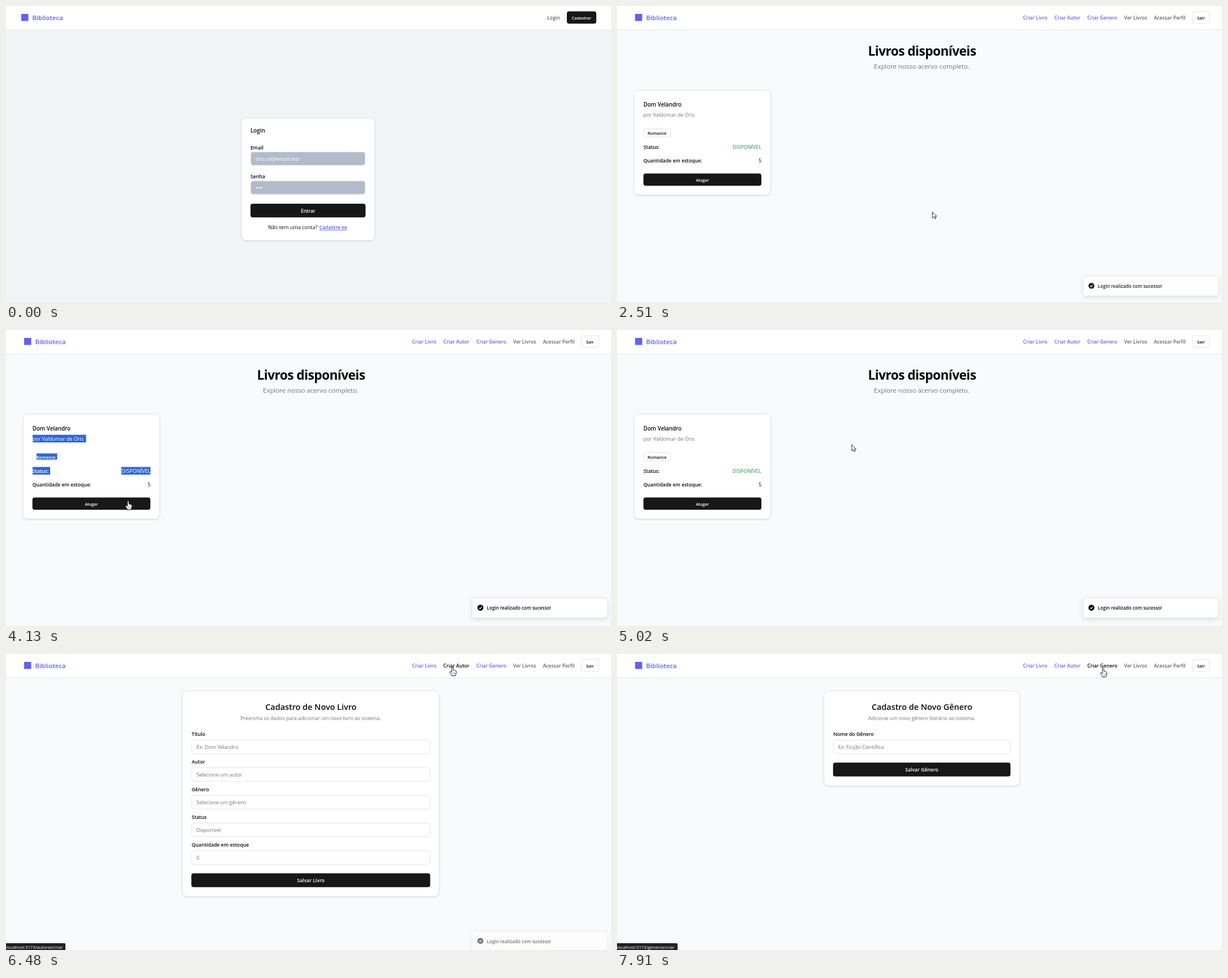
These frames come from a looping animation (1069 by 524 pixels, 8 s). An HTML page:

```html
<!DOCTYPE html>
<html lang="pt-BR">
<head>
<meta charset="utf-8">
<title>Biblioteca</title>
<style>
html, body { margin: 0; width: 100%; height: 100%; overflow: hidden; background: #f3f4f6; }
svg { display: block; width: 1069px; height: 524px; font-family: "Open Sans", "Noto Sans", sans-serif; }
.card { filter: drop-shadow(0 1px 1px rgba(0,0,0,.12)); }
#toast rect { filter: drop-shadow(0 3px 4px rgba(0,0,0,.1)); }
</style>
</head>
<body>
<svg id="stage" viewBox="0 0 1069 524"></svg>
<script>
const LOOP = 8000, INK = '#0a0a0a', DARK = '#171717', GRAY = '#737373', INDIGO = '#615fff', LINE = '#e2e4e8';
const $ = id => document.getElementById(id);

// Markup helpers
const text = (x, y, s, size, { fill = INK, w = 400, a = 'start', more = '' } = {}) =>
  `<text x="${x}" y="${y}" font-size="${size}" fill="${fill}" font-weight="${w}" text-anchor="${a}" ${more}>${s}</text>`;
const bold = (x, y, s, size = 8.7, o = {}) => text(x, y, s, size, { w: 600, ...o });
const mid = (x, y, s, size, fill = INK) => bold(x, y, s, size, { fill, a: 'middle' });
const rect = (x, y, w, h, r, fill, more = '') =>
  `<rect x="${x}" y="${y}" width="${w}" height="${h}" rx="${r}" fill="${fill}" ${more}/>`;
const box = (x, y, w, h, r, fill = '#fff', more = '') => rect(x, y, w, h, r, fill, `stroke="${LINE}" ${more}`);
const card = (x, y, w, h) => box(x, y, w, h, 8, '#fff', 'class="card"');
const group = (id, body) => `<g id="${id}">${body}</g>`;
const brand = x => rect(x, 14, 12.5, 12.5, 0, INDIGO) + bold(x + 19.5, 24.8, 'Biblioteca', 11.3, { fill: INDIGO });
const bar = rect(0, 0, 1069, 42, 0, '#fff') + rect(0, 42, 1069, 1, 0, '#e5e7eb');

const links = [[739, 'Criar Livro'], [795.8, 'Criar Autor'], [857.5, 'Criar Genero']];
const paths = ['livros', 'autores', 'generos'];

function loginPage() {
  const field = (y, label) => bold(432, y, label) + box(432.5, y + 4.5, 202, 23.5, 4, '#b3bbca');
  return rect(0, 0, 1069, 524, 0, '#f3f4f6') + bar + brand(27) +
    bold(956, 24, 'Login', 8.8, { fill: '#62626a' }) +
    rect(991, 9.5, 52, 21.7, 4, DARK) + mid(1017, 23.5, 'Cadastrar', 7.3, '#fff') +
    card(416, 198.5, 235.5, 216.5) + bold(432, 224, 'Login', 9.8) +
    field(254, 'Email') + text(441, 273.5, 'tino.vd@email.test', 8.95, { fill: '#fff' }) +
    field(305.3, 'Senha') +
    [443, 447, 451].map(x => `<circle cx="${x}" cy="321.7" r="1.3" fill="#fff"/>`).join('') +
    group('ring', rect(431.7, 349.7, 204.1, 25, 5, '#fff', 'stroke="#0a0a0a" stroke-width="1.3"')) +
    rect(432, 350, 203.3, 24.3, 4, DARK, 'id="enter"') + mid(533.7, 365.6, 'Entrar', 8.5, '#fff') +
    text(463, 395.3, 'Não tem uma conta?', 9.05) +
    bold(553.5, 395.3, 'Cadastre-se', 8.7, { fill: '#5558f6', more: 'text-decoration="underline"' });
}

function booksPage() {
  return text(539, 88, 'Livros disponíveis', 22.7, { w: 700, a: 'middle', more: 'letter-spacing="-.57"' }) +
    text(538.5, 111, 'Explore nosso acervo completo.', 11.4, { fill: GRAY, a: 'middle' }) +
    card(30, 149, 241.5, 185.5) + bold(46.7, 177.5, 'Dom Velandro', 9.8) +
    box(47, 216.8, 48.3, 15, 4) +
    rows.map((_, i) => group('sel' + i, '')).join('') +
    bold(46.7, 276.8, 'Quantidade em estoque:') + text(255.3, 276.8, '5', 9, { a: 'end' }) +
    rect(46.7, 296.6, 208.4, 21.6, 4, DARK, 'id="rent"') + mid(151, 310.8, 'Alugar', 7.4, '#fff');
}

// Selectable text: highlight box and the text in a given colour
const rows = [
  [[47, 185.5, 94.5, 13.5], c => text(46.7, 195.7, 'por Valdomar de Oris', 9.05, { fill: c || GRAY })],
  [[54, 218.5, 36.5, 11], c => bold(54, 227.5, 'Romance', 7.5, { fill: c || INK })],
  [[47, 242.5, 31, 13.5], c => bold(46.7, 252.6, 'Status:', 8.7, { fill: c || INK })],
  [[203.7, 242.5, 51.6, 13.5], c => text(255.3, 252.6, 'DISPONÍVEL', 9.1, { fill: c || '#2b8a5c', a: 'end' })]
];
const selectAt = [3500, 3590, 3700, 3770], deselect = 4330;

function formPage(kind, intro, w, pitch, fields) {
  const x = 538.5 - w / 2, top = 152 + pitch * (fields.length - 1) + 40.5;
  return card(x, 65, w, top - 24.3) + mid(538.8, 98.5, 'Cadastro de Novo ' + kind, 14.4) +
    text(538.5, 117.3, intro, 8.9, { fill: GRAY, a: 'middle' }) +
    fields.map(([label, hint], i) => {
      const y = 152.3 + i * pitch;
      return bold(x + 16.5, y - 7.2, label) + box(x + 16.5, y, w - 33, 24, 4) +
        text(x + 25, y + 15.6, hint, 8.95, { fill: GRAY });
    }).join('') +
    rect(x + 16, top - .3, w - 32, 24.5, 4, DARK) + mid(538.5, top + 15.3, 'Salvar ' + kind, 8.7, '#fff');
}

const forms = [
  formPage('Livro', 'Preencha os dados para adicionar um novo livro ao sistema.', 454, 49, [
    ['Título', 'Ex: Dom Velandro'], ['Autor', 'Selecione um autor'], ['Gênero', 'Selecione um gênero'],
    ['Status', 'Disponível'], ['Quantidade em estoque', '0']]),
  formPage('Autor', 'Preencha os dados para adicionar um novo autor ao sistema.', 345.5, 50, [
    ['Nome do Autor', 'Ex: Valdomar de Oris'], ['Email', 'email@exemplo.com']]),
  formPage('Gênero', 'Adicione um novo gênero literário ao sistema.', 345.5, 50, [
    ['Nome do Gênero', 'Ex: Ficção Científica']])
];

const toast = box(823.5, 474.5, 239.5, 35, 5) +
  '<circle cx="838.3" cy="491.6" r="5.3" fill="#0a0a0a"/>' +
  '<path d="M836 491.8l1.7 1.7 3-3.3" fill="none" stroke="#fff" stroke-width="1.2"/>' +
  bold(849.6, 495.3, 'Login realizado com sucesso!', 8.15);

const arrow = '<path d="M.3 .5V11.3L2.8 9 4.6 12.9 6.5 12 4.8 8.3H8Z" fill="#fff" stroke="#111" stroke-width=".9"/>';
const hand = '<path d="M-1.3 9.3V1.3Q-1.3 0 0 0T1.3 1.3V5.6Q2.8 4.9 3.2 6.1 4.6 5.4 5 6.7 6.4 6.4 6.5 7.8V11Q6.3 13 5 14.2V15.6H-1.6V14.2Q-3.4 12-4.8 9.4-5 7.9-3.5 8Z" fill="#fff" stroke="#111" stroke-width=".95"/>' +
  '<path d="M.6 10V13M2.5 10V13M4.3 10V13" stroke="#333" stroke-width=".5"/>';

$('stage').innerHTML = group('login', loginPage()) +
  group('app', rect(0, 0, 1069, 524, 0, '#f9fafb') + bar + brand(32) +
    links.map(([x, s], i) => group('link' + i, mid(x, 24, s, 8.6, 'inherit'))).join('') +
    mid(916.3, 24, 'Ver Livros', 8.6, '#62626a') + mid(976.7, 24, 'Acessar Perfil', 8.6, '#62626a') +
    box(1016.5, 9.8, 30.7, 21.3, 4) + mid(1031.8, 23.5, 'Sair', 7.4) +
    group('books', booksPage()) +
    forms.map((f, i) => group('form' + i, f)).join('') +
    group('toast', toast) +
    group('status', '<path id="tip" fill="#202124"/>' + text(.6, 521.6, '', 7.6, { fill: '#fff', more: 'id="url"' }))) +
  '<circle id="click" cx="557" cy="364" r="8" fill="#ffee00" opacity=".52"/>' +
  group('cursor', group('arrow', arrow) + group('hand', hand));

// Timeline
const starts = [0, 390, 1220, 1820, 2230, 3070, 3910, 4740, 5580, 6410, 7090, 7500];
const STEP = 68.3;
const track = [
  [390, 1006, 514], [1150, 560, 371], [1360, 557, 364], [2560, 557, 364], [3000, 661, 290],
  [3400, 135, 160], [3480, 138, 168], [3840, 328, 250], [4130, 215, 303], [4330, 214, 304],
  [4610, 216, 285], [4740, 230, 275], [5510, 870, 24], [5580, 868, 23], [5860, 727, 20],
  [6200, 726, 19.5], [6340, 782, 22.5], [6480, 789, 23], [7480, 789, 23], [7840, 859, 25]
];
const hovers = [[5440, 2], [5650, 1], [5790, 0], [6270, 1], [7640, 2]];
const pages = [[6200, 0], [7080, 1], [7840, 2]];

const clamp = v => Math.max(0, Math.min(1, v));
const show = (id, on) => { $(id).style.display = on ? '' : 'none'; };
const last = (list, t) => list.filter(e => e[0] <= t).pop();
const mix = (a, b, k) => `rgb(${a.map((v, i) => Math.round(v + (b[i] - v) * k))})`;
const between = (t, a, b) => t >= a && t < b;

function pointer(t) {
  const i = track.findIndex(k => k[0] > t);
  if (i < 0) return track[track.length - 1].slice(1);
  if (!i) return track[0].slice(1);
  const [a, b] = [track[i - 1], track[i]], u = (t - a[0]) / (b[0] - a[0]), e = u * u * (3 - 2 * u);
  return [a[1] + (b[1] - a[1]) * e, a[2] + (b[2] - a[2]) * e];
}

function draw(now) {
  const start = starts.filter(s => s <= now).pop();
  const t = start + Math.floor((now - start + 1) / STEP) * STEP;
  const logged = t >= 2230, page = last(pages, t), hover = last(hovers, t);
  show('login', !logged);
  show('app', logged);

  // Pointer
  const [x, y] = pointer(t);
  const inside = (l, u, r, d) => x > l && x < r && y > u && y < d;
  const onEnter = !logged && inside(432, 350, 635, 374);
  const onRent = logged && !page && inside(47, 296, 255, 318);
  const isHand = onEnter || onRent || (logged && inside(715, 8, 886, 33));
  show('cursor', t >= 390);
  show('hand', isHand);
  show('arrow', !isHand);
  $('cursor').setAttribute('transform', `translate(${x} ${y})`);

  // Login button
  const focus = between(t, 1820, 2230), e = $('enter'), inset = focus ? 1.8 : 0;
  show('ring', focus);
  show('click', between(t, 1820, 1885));
  e.setAttribute('x', 432 + inset);
  e.setAttribute('y', 350 + inset);
  e.setAttribute('width', 203.3 - 2 * inset);
  e.setAttribute('height', 24.3 - 2 * inset);
  e.setAttribute('fill', mix([23, 23, 23], [46, 46, 46], onEnter ? clamp((t - 1050) / 150) : 0));
  if (!logged) return;

  // Book list and forms
  show('books', !page);
  forms.forEach((_, i) => show('form' + i, page && page[1] === i));
  rows.forEach(([r, label], i) => {
    const on = between(t, selectAt[i], deselect), g = $('sel' + i);
    if (g.dataset.on !== String(on)) {
      g.dataset.on = on;
      g.innerHTML = on ? rect(...r, 0, '#2f66d3') + label('#fff') : label();
    }
  });
  $('rent').setAttribute('fill', mix([23, 23, 23], [46, 46, 46], onRent ? clamp((t - 4110) / 150) : 0));

  // Navigation hover and address tip
  links.forEach((_, i) => {
    let k = 0;
    hovers.forEach(([at, n], j) => {
      const end = j + 1 < hovers.length ? hovers[j + 1][0] : LOOP + 999;
      k = Math.max(k, n === i ? Math.min(clamp((t - at) / 150), 1 - clamp((t - end) / 150)) : 0);
    });
    $('link' + i).firstChild.setAttribute('fill', mix([97, 95, 255], [10, 10, 10], k));
  });
  show('status', t >= 5580);
  if (hover) {
    const w = [97.5, 105, 107][hover[1]];
    $('tip').setAttribute('d', `M0 512H${w - 2}q2 0 2 2V524H0Z`);
    $('url').textContent = `localhost:5173/${paths[hover[1]]}/criar`;
  }

  // Toast
  const rise = 1 - (1 - clamp((t - 2230) / 400)) ** 2;
  const leave = 1 - (1 - clamp((t - 6380) / 380)) ** 2;
  show('toast', leave < 1);
  $('toast').setAttribute('transform', `translate(0 ${36 * (1 - rise + leave)})`);
  $('toast').setAttribute('opacity', rise * (1 - leave));
}

function tick() {
  draw(performance.now() % LOOP);
  requestAnimationFrame(tick);
}
tick();
</script>
</body>
</html>
```
